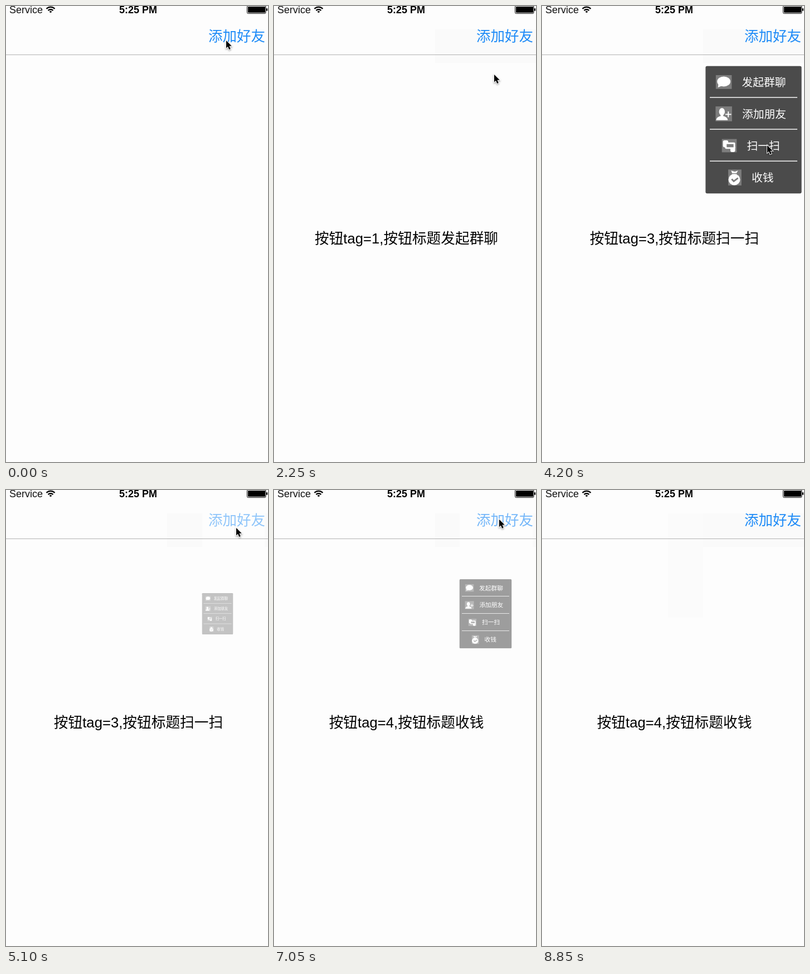
Animation, 470 px wide and 818 px high, one loop 9160 ms. Source, as an HTML page with a canvas:

```html
<!DOCTYPE html>
<html lang="zh">
<head>
<meta charset="utf-8">
<title>Popup menu</title>
<style>
  html, body { margin: 0; width: 100%; height: 100%; overflow: hidden; background: #fdfdfd; }
  canvas { display: block; width: 470px; height: 818px; }
</style>
</head>
<body>
<canvas id="stage" width="470" height="818"></canvas>
<script>
const c = document.getElementById('stage').getContext('2d');
const LOOP = 9160, LAST = 8850, STEP = 150;
const FADE = 300, PRESS = 165;
const BG = '#fdfdfd', DARK = '#424242', BACK = '#777', WHITE = '#fff', BLUE = '#1e8bf7';
const FONT = '"Liberation Sans", "Noto Sans CJK SC", "Noto Sans CJK", sans-serif';
const MENU = { x: 289, y: 102, w: 181, row: 60, cx: 379.5, cy: 222 };
const TITLE = 20.8, GAP = 19;

// Each visit: the button is clicked at `at`, the menu is dismissed at `to`.
const visits = [
  { open: 600, close: 1880, pick: 0, at: [395, 62], to: [395, 123] },
  { open: 3163, close: 4160, pick: 2, at: [404, 67], to: [404, 250] },
  { open: 4990, close: 5851, pick: 3, at: [413, 68], to: [387, 306] },
  { open: 6897, close: 7655, pick: -1, at: [406, 51], to: [185, 234] }
];
const EXIT = [436, 796];

const items = [
  { title: '发起群聊', w: 30, h: 26, icon: bubble },
  { title: '添加朋友', w: 31, h: 28, icon: person },
  { title: '扫一扫', w: 28, h: 25, icon: scan },
  { title: '收钱', w: 25, h: 30, icon: bag }
];

const clamp = v => Math.max(0, Math.min(1, v));
const smooth = v => { v = clamp(v); return v * v * (3 - 2 * v); };
const easeIn = v => v ** 3;
const easeOut = v => 1 - (1 - v) ** 3;

function rect(color, x, y, w, h) {
  c.fillStyle = color;
  c.fillRect(x, y, w, h);
}

function round(color, x, y, w, h, r) {
  c.fillStyle = color;
  c.beginPath();
  c.roundRect(x, y, w, h, r);
  c.fill();
}

function oval(x, y, rx, ry, from = 0) {
  c.beginPath();
  c.ellipse(x, y, rx, ry, 0, from, Math.PI * 2);
  c.fill();
}

function poly(...p) {
  c.beginPath();
  for (let i = 0; i < p.length; i += 2) c.lineTo(p[i], p[i + 1]);
  c.closePath();
}

function text(str, x, y, size, color, align = 'center', weight = 300) {
  c.font = `${weight} ${size}px ${FONT}`;
  c.textAlign = align;
  c.fillStyle = color;
  c.fillText(str, x, y);
}

// Icons are drawn around their own centre.
function bubble() {
  oval(0, -1, 12.5, 9.5);
  poly(-10, 3, -11, 10, -3, 7);
  c.fill();
}

function person() {
  oval(-3.5, -4, 5.5, 7);
  c.fillRect(-6, 0, 5, 6);
  oval(-3.5, 12, 11, 8, Math.PI);
  c.fillRect(3, 0, 11, 2);
  c.fillRect(7.5, -4.5, 2, 11);
}

function scan() {
  round(WHITE, -12, -10, 10, 13, 3);
  round(WHITE, -8, -6, 19, 12, 2);
  round(WHITE, 2, 0, 9, 12, 3);
  rect(BACK, -5, -3, 13, 6);
}

function bag() {
  oval(-1, 4, 11, 10.5);
  c.fillRect(-5.5, -6.5, 9, 3);
  poly(-7, -13, 0, -11, 6, -13, 3, -8, -5, -8);
  c.fill();
  c.strokeStyle = BACK;
  c.lineWidth = 3;
  c.beginPath();
  c.moveTo(-6, 3);
  c.lineTo(-2, 7);
  c.lineTo(6, 1);
  c.stroke();
}

function drawStatus() {
  text('Service', 6, 13, 18, '#111', 'left', 400);
  text('5:25 PM', 237, 13, 18, '#000', 'center', 700);

  c.strokeStyle = '#000';
  c.lineWidth = 2.4;
  for (let r = 2; r < 12; r += 4.3) {
    c.beginPath();
    c.arc(80, 12.5, r, -Math.PI * 0.75, -Math.PI * 0.25);
    c.stroke();
  }

  c.lineWidth = 1;
  c.beginPath();
  c.roundRect(432.5, -0.5, 33.5, 14, 2);
  c.stroke();
  round('#000', 434, 1, 31, 11, 1);
  round('#000', 467, 4, 2, 5, 1);
}

function drawRow({ title, w, h, icon }, i) {
  const y = MENU.y + MENU.row * (i + 0.5);
  const left = MENU.cx - 5 - (w + GAP + title.length * TITLE) / 2;
  rect(BACK, left, y - h / 2, w, h);
  c.save();
  c.translate(left + w / 2, y);
  c.fillStyle = WHITE;
  icon();
  c.restore();
  text(title, left + w + GAP, y + 7.5, TITLE, WHITE, 'left');
  if (i) rect(WHITE, 297, y - 31.7, 165, 1.5);
}

// The menu scales about its centre; a veil on top fades it as one layer.
function drawMenu(scale) {
  const shape = [MENU.x, MENU.y, MENU.w, MENU.row * items.length, 3];
  c.save();
  c.translate(MENU.cx, MENU.cy);
  c.scale(scale, scale);
  c.translate(-MENU.cx, -MENU.cy);
  round(DARK, ...shape);
  items.forEach(drawRow);
  c.globalAlpha = 1 - scale;
  round(BG, ...shape);
  c.restore();
}

function pointerAt(t) {
  let p = visits[0].at;
  const glide = (to, start, time, ease) => {
    const k = ease(clamp((t - start) / time));
    p = p.map((v, i) => v + (to[i] - v) * k);
  };
  for (const v of visits) {
    glide(v.at, v.open - PRESS - 500, 500, easeOut);
    glide(v.to, v.close - 700, 450, easeIn);
  }
  glide(EXIT, 8100, 600, smooth);
  return p;
}

function drawPointer(t) {
  c.save();
  c.translate(...pointerAt(t));
  poly(0, 0, 0, 13.5, 3, 10.8, 5.2, 16, 7.8, 15, 5.5, 9.8, 9.8, 9.8);
  c.shadowColor = 'rgba(0,0,0,.4)';
  c.shadowBlur = 3;
  c.shadowOffsetY = 1.5;
  c.strokeStyle = WHITE;
  c.lineWidth = 1.8;
  c.stroke();
  c.shadowColor = 'transparent';
  c.fillStyle = '#000';
  c.fill();
  c.restore();
}

// Faint shade left around the button once the menu has been shown
function drawShade(t, scale, lit) {
  if (t < visits[0].open) return;
  rect('#fafafa', 289, 42, 181, 60);
  if (t > visits[3].open + FADE) rect('#fbfbfb', 226, 42, 63, 187);
  if (lit && scale > 0) {
    const left = MENU.cx - MENU.w / 2 * scale;
    rect(BG, left, 42, 464 - left, 60);
  }
}

function draw(t) {
  let scale = 0, alpha = 1, pick = -1;
  for (const v of visits) {
    if (t < v.open - PRESS) break;
    scale = smooth((t - v.open) / FADE) * (1 - smooth((t - v.close) / FADE));
    alpha = 0.2 + 0.8 * clamp((t - v.open) / FADE);
    if (t >= v.close && v.pick >= 0) pick = v.pick;
  }

  rect(BG, 0, 0, 470, 818);
  drawShade(t, scale, alpha < 1);
  rect('#b2b2b2', 0, 87, 470, 1);
  drawStatus();

  c.globalAlpha = alpha;
  text('添加好友', 414, 63, 25.5, BLUE);
  c.globalAlpha = 1;

  if (pick >= 0) {
    text(`按钮tag=${pick + 1},按钮标题${items[pick].title}`, 237.5, 426, 25.7, '#000');
  }
  if (scale > 0.01) drawMenu(scale);
  if (t < LAST) drawPointer(t);
}

const start = performance.now();
function tick() {
  const t = (performance.now() - start) % LOOP;
  draw(Math.min(LAST, Math.floor(t / STEP) * STEP));
  requestAnimationFrame(tick);
}
tick();
</script>
</body>
</html>
```
